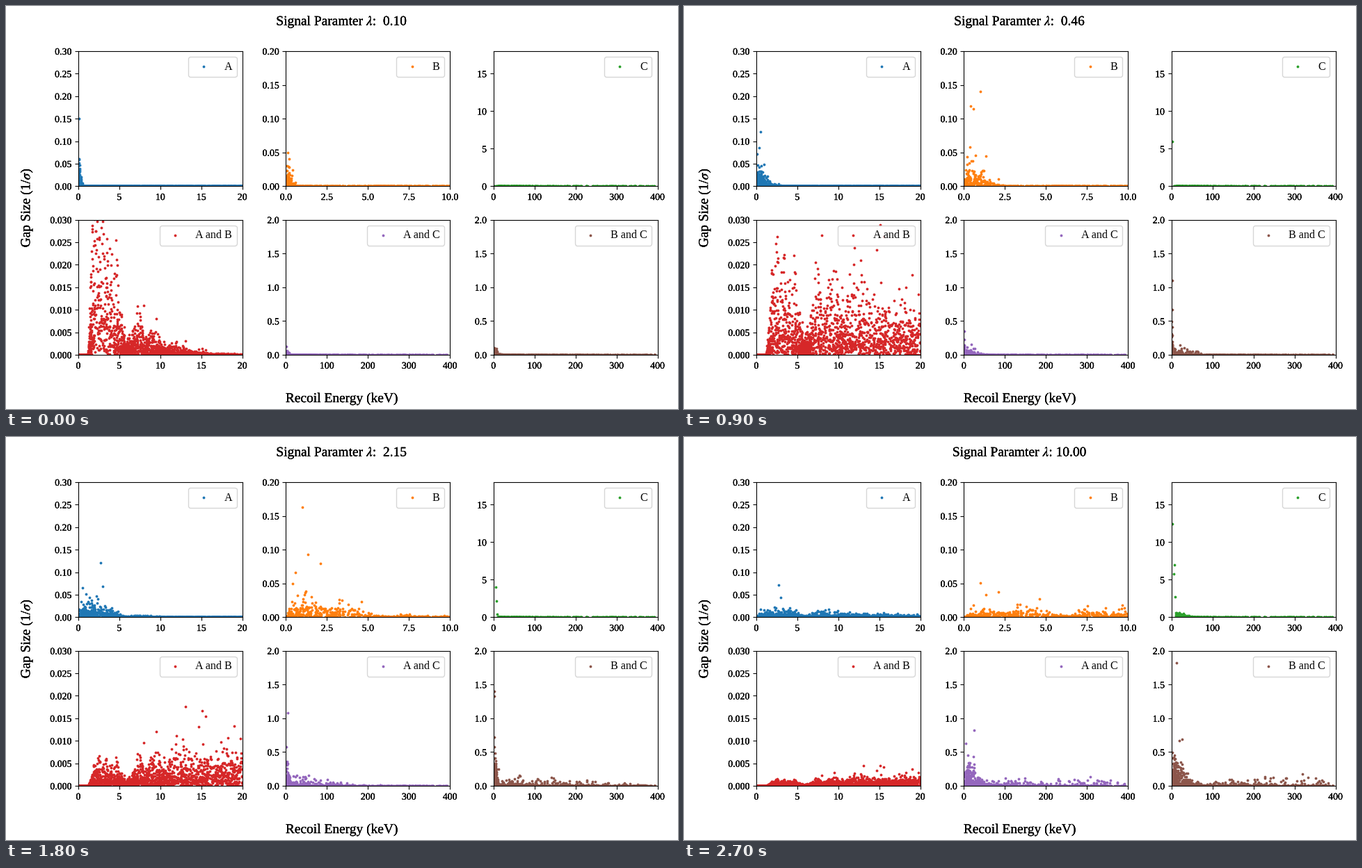
These frames come from a looping animation (966 by 580 pixels, 3000 ms). A matplotlib script:

```python
import numpy as np
import matplotlib.pyplot as plt
from matplotlib import patheffects
from matplotlib.animation import FuncAnimation

WIDTH, HEIGHT, DPI = 966, 580, 100
LAMBDAS = np.geomspace(0.1, 10, 10)
NARROW = 1e-3
rng = np.random.default_rng(7)

plt.rcParams.update({
    "font.family": "Liberation Serif",
    "mathtext.fontset": "stix",
    "font.size": 10,
    "legend.fontsize": 11.63,
})
HEAVY = [patheffects.Normal()] * 3


def dip(x):
    """Dense band near 6 keV where the gaps are short."""
    return 1 - 0.8 * np.exp(-(x - 5.9) ** 2)


def single(x):
    return 0.05 * x / (1 + 0.4 * x) * dip(x)


def double(x):
    return (0.0033 + 0.0003 * x) * np.clip(x - 1.2, 0, 1) * dip(x)


def population(mean, lo, hi, count, scale=1, power=1, large=()):
    """Columns: position, decay energy, strength, half width of each gap.

    Events lie closer together where the mean gap is short.
    """
    grid = np.linspace(lo, hi, 4000)
    cdf = np.cumsum(np.maximum(mean(grid), 1e-3) ** -0.6)
    x = np.interp(rng.uniform(cdf[0], cdf[-1], count), cdf, grid)
    strength = mean(x) * rng.weibull(1.2, count)
    rows = np.column_stack([x, strength, np.full(count, NARROW)])
    if large:
        rows = np.vstack([rows, [(*p, NARROW)[:3] for p in large]])
    x, strength, half = rows.T
    return np.column_stack([x, scale * x**power, strength, half])


def gap_size(points, lam):
    """Exponential recoil spectrum integrated over each gap."""
    _, decay, strength, half = points.T
    return strength * np.exp(-decay / lam) * np.sinh(half / lam) / half


a = population(single, 0, 20, 1500,
               large=[(0.1, 0.041), (0.55, 0.184), (2.75, 0.94), (3, 0.589)])
b = population(single, 0, 10, 600,
               large=[(0.4, 0.13), (0.58, 0.186), (1, 0.56), (1.35, 0.376),
                      (2.1, 0.457), (4.6, 0.426)])
c = population(lambda x: x, 11, 396, 320,
               large=[(2.66, 162, 1.69), (5.28, 98, 0.925),
                      (7.6, 148, 1.4), (9.8, 73.6, 0.8)])
ab = population(double, 0, 20, 1850, scale=0.0385,
                large=[(8, 0.024), (15.1, 0.047), (15.5, 0.044), (19, 0.04)])
ac = np.vstack([
    population(lambda x: 0.12 * x**1.4, 1, 396, 550, scale=0.63, power=1.1,
               large=[(1.8, 2.19), (3.8, 8.26), (25, 72)]),
    population(lambda x: 0.005 * (x + 1), 1, 396, 250, scale=0.047,
               large=[(24, 0.5), (26, 0.6)]),
])
bc = np.vstack([
    population(lambda x: 0.3 * x**1.2, 1, 396, 550, scale=0.63, power=1.1,
               large=[(1.55, 4.6), (2, 5.66), (12, 48)]),
    population(lambda x: 0.003 * (x + 0.5), 0.5, 396, 300, scale=0.025),
])

# label, points, x limit, x step, y limit, y step
PANELS = [
    ("A", a, 20, 5, 0.3, 0.05),
    ("B", b, 10, 2.5, 0.2, 0.05),
    ("C", c, 400, 100, 18, 5),
    ("A and B", ab, 20, 5, 0.03, 0.005),
    ("A and C", ac, 400, 100, 2, 0.5),
    ("B and C", bc, 400, 100, 2, 0.5),
]

fig = plt.figure(figsize=(WIDTH / DPI, HEIGHT / DPI), dpi=DPI)
title = fig.suptitle("", fontsize=14, path_effects=HEAVY)
fig.supxlabel("Recoil Energy (keV)", fontsize=14, path_effects=HEAVY)
fig.supylabel(r"Gap Size (1/$\sigma$)", fontsize=14, path_effects=HEAVY)

scatters = []
for i, (label, points, x_max, x_step, y_max, y_step) in enumerate(PANELS):
    row, col = divmod(i, 3)
    left, bottom = 103.9 + 298.4 * col, HEIGHT - 259.4 - 242.7 * row
    ax = fig.add_axes([left / WIDTH, bottom / HEIGHT, 235.8 / WIDTH, 194.4 / HEIGHT])
    scatters.append(ax.scatter(points[:, 0], gap_size(points, LAMBDAS[0]),
                               s=3, color=f"C{i}", label=label))
    ax.set_xticks(np.arange(0, x_max * 1.001, x_step))
    ax.set_yticks(np.arange(0, y_max * 1.001, y_step))
    ax.set(xlim=(0, x_max), ylim=(0, y_max))
    plt.setp(ax.get_xticklabels() + ax.get_yticklabels(), path_effects=HEAVY)
    ax.legend(loc="upper right")


def update(frame):
    lam = LAMBDAS[frame]
    title.set_text(rf"Signal Paramter $\lambda$: {lam:5.2f}")
    for scatter, (_, points, *_) in zip(scatters, PANELS):
        scatter.set_offsets(np.column_stack([points[:, 0], gap_size(points, lam)]))
    return [title, *scatters]


anim = FuncAnimation(fig, update, frames=len(LAMBDAS), interval=300,
                     repeat=True, repeat_delay=0)
plt.show()
```
